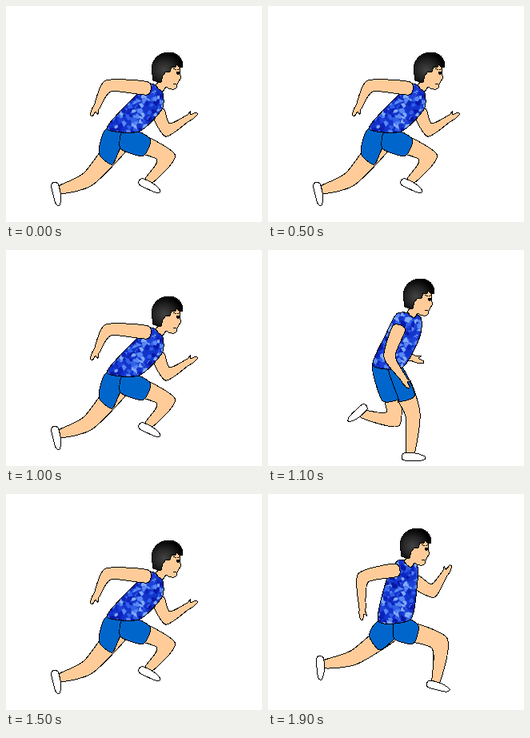
An HTML page for the animation above (2 s loop, 320x270 px).

```html
<!DOCTYPE html>
<html lang="en">
<head>
<meta charset="utf-8">
<title>Runner</title>
<style>
  html, body { margin: 0; width: 100%; height: 100%; overflow: hidden; background: #fff; }
  svg { display: block; width: 100%; height: 100%; }
  path { stroke: #000; stroke-width: 1; stroke-linejoin: round; shape-rendering: crispEdges; }
  .pose { opacity: 0; animation: show 500ms step-end infinite; }
  @keyframes show { 0% { opacity: 1; } 20%, 100% { opacity: 0; } }
</style>
</head>
<body>
<svg id="stage" viewBox="0 0 320 270">
  <defs>
    <radialGradient id="hair" cx=".4" cy=".6" r=".6">
      <stop offset="0" stop-color="#444"/>
      <stop offset=".5" stop-color="#262626"/>
      <stop offset="1" stop-color="#000"/>
    </radialGradient>
    <pattern id="camo" width="64" height="64" patternUnits="userSpaceOnUse">
      <rect width="64" height="64" fill="#1234cc"/>
    </pattern>
    <g id="head">
      <path fill="#fc9" d="M193 92 L187 99 Q191 105 196 107 L200 101 Q205 105 210 104 Q214 103 214 98 L216 94 L219 90 L217 84 L218 74 L206 70 L196 80 Z"/>
      <path fill="url(#hair)" d="M190 95 L184 93 L182 78 C183 66 192 58 204 58 C214 58 221 65 221 76 L217 77 L214 73 L211 77 L207 76 L205 82 L200 82 L196 87 L194 95 Z"/>
      <path fill="none" d="M209 78 L213 80 M214 80 L218 78 M209 97 L213 98"/>
      <path fill="#000" d="M213 82 L216 82 L216 85 L214 85 Z"/>
    </g>
  </defs>
</svg>
<script>
const NS = 'http://www.w3.org/2000/svg';
const STEP = 100;
const SKIN = '#fc9', SHORTS = '#06c', SHOE = '#fff', SHIRT = 'url(#camo)';
const ARM_WIDTHS = [8, 6.5, 4], LEG_WIDTHS = [12, 9, 5], HEM_WIDTH = 11;

// Local outlines: x runs toward the fingertips or toes.
const HAND = [[6, 4], [14, 2], [14, -1], [7, -2], [9, -6], [4, -4]];
const FOOT = [[-8, 0], [-11, 5], [-7, 9], [14, 9], [19, 6], [16, 3], [6, 0]];

function add(parent, tag, attrs) {
  const node = document.createElementNS(NS, tag);
  for (const key in attrs) node.setAttribute(key, attrs[key]);
  parent.appendChild(node);
  return node;
}

const mid = (a, b) => [(a[0] + b[0]) / 2, (a[1] + b[1]) / 2];
const heading = (a, b) => Math.atan2(b[1] - a[1], b[0] - a[0]);
const place = (origin, angle, [x, y]) => [
  origin[0] + x * Math.cos(angle) - y * Math.sin(angle),
  origin[1] + x * Math.sin(angle) + y * Math.cos(angle)
];

// Closed, lightly rounded outline.
function curve(pts, tension = 0.12) {
  const at = i => pts[(i + pts.length) % pts.length];
  const handle = (i, sign) => [0, 1].map(k => at(i)[k] + sign * tension * (at(i + 1)[k] - at(i - 1)[k]));
  return 'M' + at(0) + pts.map((_, i) => `C${handle(i, 1)} ${handle(i + 1, -1)} ${at(i + 1)}`).join('') + 'Z';
}

// Tapered two-bone limb, with an optional end piece in the same outline.
function limb([root, joint, end], widths, tip = []) {
  const upper = heading(root, joint), lower = heading(joint, end);
  const bend = Math.atan2(Math.sin(lower - upper), Math.cos(lower - upper)) / 2;
  const miter = Math.min(1.3, 1 / Math.cos(bend));
  const side = sign => [
    place(root, upper, [0, sign * widths[0]]),
    place(joint, upper + bend, [0, sign * widths[1] * miter]),
    place(end, lower, [0, sign * widths[2]])
  ];
  return [...side(1), ...tip.map(p => place(end, lower, p)), ...side(-1).reverse()];
}

function shortsLeg([hip, knee], waist, crotch, sign) {
  const hem = side => place(mid(hip, knee), heading(hip, knee), [0, side * HEM_WIDTH]);
  return [waist[0], hem(sign), hem(-sign), crotch, waist[1]];
}

// Camouflage cloth: seeded irregular flecks.
let seed = 11;
const rand = () => (seed = seed * 16807 % 2147483647) / 2147483647;
const camo = document.getElementById('camo');
const blues = ['#0818a8', '#2f60e8', '#0c24bc', '#5888f4', '#1c40d8', '#80acfa'];
for (let i = 0; i < 240; i++) {
  const center = [rand() * 64, rand() * 64], size = 2 + rand() * 3;
  const points = Array.from({ length: 5 }, (_, k) => place(center, k * Math.PI * 0.4, [size * (0.3 + rand()), 0])).join(' ');
  add(camo, 'polygon', { points, fill: blues[i % blues.length] });
}

// Torso corners: nape, throat, chest, front waist, back waist, back.
// Legs: hip, knee, ankle. Arms: shoulder, elbow, wrist. Feet: degrees.
const push = {
  head: [0, 0],
  torso: [[179, 97], [195, 106], [195, 129], [166, 157], [126, 153], [157, 117]],
  rear: [[146, 166], [103, 216], [67, 230]], front: [[152, 166], [200, 189], [178, 219]],
  crotch: [143, 178], feet: [76, 25],
  farArm: [[190, 132], [202, 155], [226, 141]], nearArm: [[177, 103], [128, 100], [114, 125]]
};
const passing = {
  torso: [[162, 79], [190, 83], [190, 108], [168, 147], [131, 144], [147, 106]],
  rear: [[152, 164], [156, 211], [118, 205]], front: [[165, 166], [181, 206], [178, 254]],
  crotch: [163, 186], feet: [136, 0],
  farArm: [[160, 128], [170, 131], [181, 135]]
};
const stride = {
  head: [-17, -15],
  torso: [[163, 83], [186, 88], [186, 118], [178, 157], [138, 159], [148, 108]],
  rear: [[158, 168], [108, 204], [70, 213]], front: [[156, 167], [214, 186], [210, 235]],
  crotch: [158, 181], feet: [85, 14],
  farArm: [[184, 109], [206, 121], [220, 101]], nearArm: [[161, 95], [119, 105], [118, 143]]
};
const poses = [
  push,
  { ...passing, head: [-13, -22], nearArm: [[164, 97], [152, 133], [169, 160]] },
  { ...stride, farArm: stride.nearArm, nearArm: [[168, 96], ...stride.farArm.slice(1)] },
  { ...passing, head: [-7, -21], nearArm: [[165, 92], [141, 119], [147, 149]] },
  stride
];

function drawPose(group, { head, torso, rear, front, crotch, feet, farArm, nearArm }) {
  const shape = (fill, pts) => add(group, 'path', { d: curve(pts), fill });
  const [waistFront, waistBack] = torso.slice(3, 5);
  shape(SKIN, limb(farArm, ARM_WIDTHS, HAND));
  [rear, front].forEach((leg, i) => {
    shape(SKIN, limb(leg, LEG_WIDTHS));
    shape(SHOE, FOOT.map(p => place(leg[2], feet[i] * Math.PI / 180, p)));
  });
  shape(SHORTS, shortsLeg(rear, [waistBack, waistFront], crotch, 1));
  shape(SHORTS, shortsLeg(front, [waistFront, mid(waistFront, waistBack)], crotch, -1));
  shape(SHIRT, torso);
  shape(SKIN, limb(nearArm, ARM_WIDTHS, HAND));
  add(group, 'use', { href: '#head', transform: `translate(${head})` });
}

const stage = document.getElementById('stage');
poses.forEach((pose, i) => {
  const group = add(stage, 'g', { class: 'pose' });
  group.style.animationDelay = (i - poses.length) * STEP + 'ms';
  drawPose(group, pose);
});
</script>
</body>
</html>
```
